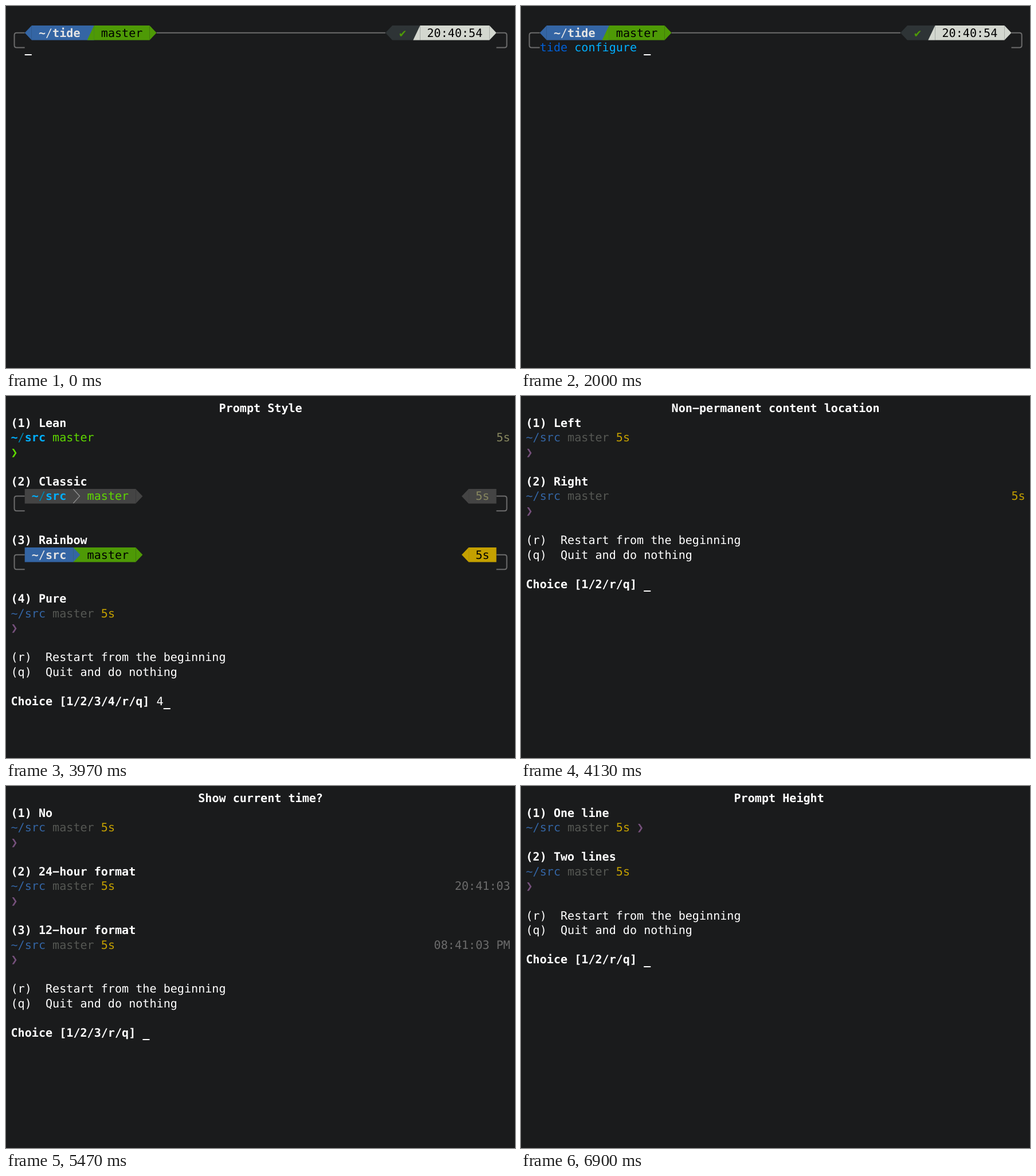
These frames come from a looping animation (888x631 px, 8000 ms). An HTML page:

```html
<!DOCTYPE html>
<html lang="en">
<head>
<meta charset="utf-8">
<title>Prompt configuration</title>
<style>
html, body { margin: 0; width: 100%; height: 100%; overflow: hidden; background: #1a1b1c; }
svg { display: block; width: 888px; height: 631px; }
text { font: 20.1px "DejaVu Sans Mono", monospace; white-space: pre; text-rendering: geometricPrecision; }
.b { font-weight: bold; }
</style>
</head>
<body>
<svg id="stage" viewBox="0 0 888 631"></svg>
<script>
const LOOP = 8000;
const CELL = 12.1, LINE = 25.55, PAD = 8.5, COLS = 72;
const WHITE = '#fff', BLACK = '#000', FRAME = '#6c6c6c';
const BLUE = '#3465a4', GREEN = '#4e9a06', YELLOW = '#c4a000', PURPLE = '#75507b';
const DIM = '#555753', LIGHT = '#d3d7cf', DARK = '#2e3436', PALE = '#e4e4e4';
const SKY = '#00afff', LIME = '#5fd700', OLIVE = '#87875f', SLATE = '#444444';
const COMMAND = '#005fd7', ERROR = '#ff0000', HINT = '#555555';

const X = col => PAD + col * CELL;
const Y = row => PAD + row * LINE;

const text = (col, row, str, fill = WHITE, bold = false) =>
  `<text x="${X(col)}" y="${Y(row) + 19.6}" fill="${fill}"${bold ? ' class="b"' : ''}>${str}</text>`;
const bold = (col, row, str, fill) => text(col, row, str, fill, true);
const cursor = (col, row) =>
  `<rect x="${X(col)}" y="${Math.round(Y(row) + 24)}" width="${CELL}" height="2" fill="${WHITE}"/>`;
const title = str => bold(Math.ceil((COLS - str.length) / 2), 0, str);

// Filled shape spanning one row; points are [column, fraction of row height].
const shape = (row, fill, ...points) =>
  `<polygon fill="${fill}" points="${points.map(([c, f]) => [X(c), Math.round(Y(row)) + f * LINE])
    .join(' ')}"/>`;
const block = (row, from, to, fill) => shape(row, fill, [from, 0], [to, 0], [to, 1], [from, 1]);
const arrowRight = (row, col, fill) => shape(row, fill, [col, 0], [col + 1, .5], [col, 1]);
const arrowLeft = (row, col, fill) => shape(row, fill, [col + 1, 0], [col, .5], [col + 1, 1]);
const slant = (row, col, fill) => shape(row, fill, [col + 1, 0], [col + 1, 1], [col, 1]);
const stroke = (d, color = FRAME, width = 2) =>
  `<path d="${d}" fill="none" stroke="${color}" stroke-width="${width}"/>`;

function bracket(row, edge, side, inner) {
  const top = Y(row + .5), bottom = Y(row + 1.5), r = 4 * side;
  return stroke(`M${X(inner)} ${top}H${X(edge) + r}q${-r} 0 ${-r} 4V${bottom - 4}q0 4 ${r} 4H${X(inner)}`);
}
const brackets = row => bracket(row, .5, 1, 2) + bracket(row, 71.5, -1, 70);

const path = (col, row, dir, color, slash = color) =>
  bold(col, row, '~', color) + text(col + 1, row, '/', slash) + bold(col + 2, row, dir, color);

const pure = (row, duration = true) =>
  text(0, row, '~/src', BLUE) + text(6, row, 'master', DIM) +
  (duration ? text(13, row, '5s', YELLOW) : '');
const chevron = (row, col = 0, fill = PURPLE) => text(col, row, '❯', fill);

const menu = (row, choices, answer) =>
  text(0, row, '(r)  Restart from the beginning') +
  text(0, row + 1, '(q)  Quit and do nothing') +
  bold(0, row + 3, `Choice [${choices}]`) +
  text(choices.length + 10, row + 3, answer) +
  cursor(choices.length + 10 + answer.length, row + 3);

function shell(typed) {
  const word = typed.slice(0, 4), complete = word === 'tide';
  return brackets(1) + stroke(`M${X(21)} ${Y(1.5)}H${X(54)}`) +
    arrowLeft(1, 2, BLUE) + block(1, 3, 12, BLUE) +
    block(1, 12, 20, GREEN) + slant(1, 11, GREEN) + arrowRight(1, 20, GREEN) +
    path(4, 1, 'tide', PALE) + text(13, 1, 'master', BLACK) +
    arrowLeft(1, 54, DARK) + block(1, 55, 59, DARK) +
    block(1, 59, 69, LIGHT) + slant(1, 58, LIGHT) + arrowRight(1, 69, LIGHT) +
    text(56, 1, '✔', GREEN) + text(60, 1, '20:40:54', BLACK) +
    text(2, 2, word, complete ? COMMAND : ERROR) +
    (word && !complete ? text(2 + word.length, 2, 'tide'.slice(word.length), HINT) : '') +
    text(7, 2, typed.slice(5), SKY) + cursor(2 + typed.length, 2);
}

const classic = row =>
  brackets(row) + block(row, 2, 18, SLATE) + arrowRight(row, 18, SLATE) +
  stroke(`M${X(9)} ${Y(row) + .5}L${X(10) - 1} ${Y(row + .5)}L${X(9)} ${Y(row + 1) - .5}`, '#949494', 1.3) +
  path(3, row, 'src', SKY, '#0087af') + text(11, row, 'master', LIME) +
  arrowLeft(row, 65, SLATE) + block(row, 66, 70, SLATE) + text(67, row, '5s', OLIVE);

const rainbow = row =>
  brackets(row) + block(row, 9, 18, GREEN) + arrowRight(row, 18, GREEN) +
  block(row, 2, 9, BLUE) + arrowRight(row, 9, BLUE) +
  path(3, row, 'src', PALE) + text(11, row, 'master', BLACK) +
  arrowLeft(row, 65, YELLOW) + block(row, 66, 70, YELLOW) + text(67, row, '5s', BLACK);

const styles = (finished, answer) =>
  title('Prompt Style') +
  bold(0, 1, '(1) Lean') + path(0, 2, 'src', SKY, '#0087af') + text(6, 2, 'master', LIME) +
  text(70, 2, '5s', OLIVE) + chevron(3, 0, LIME) +
  bold(0, 5, '(2) Classic') + classic(6) +
  bold(0, 9, '(3) Rainbow') + rainbow(10) +
  bold(0, 13, '(4) Pure') +
  (finished ? pure(14) + chevron(15) + menu(17, '1/2/3/4/r/q', answer) : cursor(0, 14));

const location_ = answer =>
  title('Non−permanent content location') +
  bold(0, 1, '(1) Left') + pure(2) + chevron(3) +
  bold(0, 5, '(2) Right') + pure(6, false) + text(70, 6, '5s', YELLOW) + chevron(7) +
  menu(9, '1/2/r/q', answer);

const clock = answer =>
  title('Show current time?') +
  bold(0, 1, '(1) No') + pure(2) + chevron(3) +
  bold(0, 5, '(2) 24−hour format') + pure(6) + text(64, 6, '20:41:03', FRAME) + chevron(7) +
  bold(0, 9, '(3) 12−hour format') + pure(10) + text(61, 10, '08:41:03 PM', FRAME) + chevron(11) +
  menu(13, '1/2/3/r/q', answer);

const height = () =>
  title('Prompt Height') +
  bold(0, 1, '(1) One line') + pure(2) + chevron(2, 16) +
  bold(0, 4, '(2) Two lines') + pure(5) + chevron(6) +
  menu(8, '1/2/r/q', '');

const timeline = [
  [0, () => shell('')],
  [600, () => shell('t')],
  [770, () => shell('ti')],
  [870, () => shell('tid')],
  [970, () => shell('tide')],
  [1130, () => shell('tide ')],
  [1500, () => shell('tide c')],
  [1670, () => shell('tide co')],
  [1830, () => shell('tide con')],
  [2000, () => shell('tide configure ')],
  [2600, () => styles(false)],
  [2700, () => styles(true, '')],
  [3970, () => styles(true, '4')],
  [4130, () => location_('')],
  [5200, () => location_('1')],
  [5470, () => clock('')],
  [6630, () => clock('1')],
  [6900, height]
];

const stage = document.getElementById('stage');
const start = performance.now();
let shown = -1;

function update() {
  const t = Math.max(0, performance.now() - start) % LOOP;
  const step = timeline.findLastIndex(([at]) => at <= t);
  if (step !== shown) {
    stage.innerHTML = timeline[step][1]();
    shown = step;
  }
  requestAnimationFrame(update);
}
update();
</script>
</body>
</html>
```
